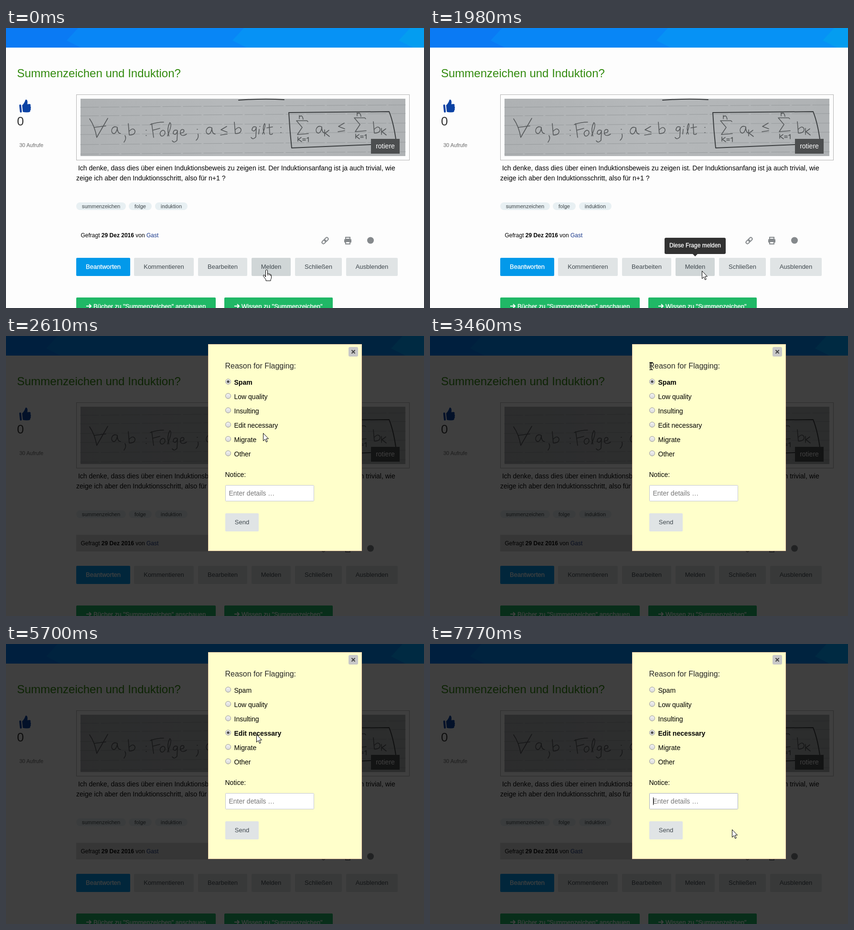
Animation of 875 by 586 pixels, one loop 8 s. Source, as an HTML page:

```html
<!DOCTYPE html>
<html lang="de">
<head>
<meta charset="utf-8">
<title>Frage melden</title>
<style>
html, body { margin: 0; width: 100%; height: 100%; overflow: hidden; background: #fdfdfd; }
svg { display: block; font-family: "Liberation Sans", Arial, sans-serif; }
.ink path { fill: none; stroke: #56595b; stroke-width: 1.6; stroke-linecap: round; stroke-linejoin: round; }
.ink .rule { stroke: #979b9d; stroke-width: 1; stroke-dasharray: 38 5; }
.ink .frame { stroke: #3c3f41; stroke-width: 2; }
.bright { fill: #fff; stroke: #fff; stroke-width: .3; }
.small { stroke: currentColor; fill: currentColor; stroke-width: .25; }
.cursor { fill: #fff; stroke: #000; stroke-linejoin: round; }
</style>
</head>
<body>
<svg id="stage" width="875" height="586" viewBox="0 0 875 586"></svg>
<script>
const stage = document.getElementById('stage');
const text = (x, y, size, str, attrs = '') => `<text x="${x}" y="${y}" font-size="${size}" ${attrs}>${str}</text>`;
const rect = (x, y, w, h, fill, attrs = '') => `<rect x="${x}" y="${y}" width="${w}" height="${h}" fill="${fill}" ${attrs}/>`;
const path = (d, attrs = '') => `<path d="${d}" ${attrs}/>`;
const group = (id, body) => `<g id="${id}">${body}</g>`;

// Header stripes: a base colour, then a slanted band from each x to the right edge
const header = (base, bands) => rect(0, 0, 875, 41, base) +
  bands.map(([x, fill]) => path(`M${x} 0L${x - 24} 26L${x + 6} 41H875V0Z`, `fill="${fill}"`)).join('');

const button = (x, w, label, fill = '#e0e4e5', attrs = 'fill="#3f484e"', id = '') =>
  rect(x, 481, w, 38, fill, `rx="2" id="${id}"`) +
  text(x + w / 2, 504, 13, label, `text-anchor="middle" ${attrs}`);

const tag = (x, w, label) => rect(x, 365, w, 16, '#e8f0f3', 'rx="8"') +
  text(x + w / 2, 377, 11, label, 'text-anchor="middle" class="small" color="#5c6468"');

const greenButton = (x, w, label) => rect(x, 564, w, 30, '#20b866', 'rx="2"') +
  path(`M${x + 21} 582h10m-4 -4l4 4l-4 4`, 'fill="none" stroke="#fff" stroke-width="2"') +
  text(x + 36, 587, 13, label, 'class="bright"');

// Handwritten formula on ruled paper
const sum = (x, y) => path(`M${x + 24} ${y + 2}L${x + 22} ${y}H${x}L${x + 12} ${y + 14}L${x + 2} ${y + 29}L${x + 25} ${y + 27}` +
  `M${x + 6} ${y - 4}v-7m0 3q6 -6 8 5` +
  `M${x + 3} ${y + 34}v9m7 -8l-6 4l7 5m2 -6h6m-6 3h6m3 -4l3 -2v9`);
const a = (x, y) => path(`M${x + 11} ${y}c-9 -5 -15 6 -10 12c6 4 10 -6 10 -12q0 13 7 13`);
const b = (x, y) => path(`M${x} ${y}l2 24q13 0 12 -9q-4 -8 -12 1`);
const leq = (x, y) => path(`M${x + 13} ${y}l-12 7l13 5M${x} ${y + 18}l14 -2`);
const g = (x, y) => path(`M${x + 9} ${y}q-8 -2 -8 7q6 5 9 -6l-1 20q-6 7 -10 1`);
const colon = (x, y) => path(`M${x} ${y}h1m-1 11h1`);
const sub = (x, y) => path(`M${x} ${y}v13m9 -12l-8 6l9 7`);
const ruled = [164, 182, 202, 221, 242, 262].map(y =>
  path(`M156 ${y + 2}Q490 ${y - 1} 836 ${y - 3}`, 'class="rule"')).join('');
const formula = `<g class="ink">${ruled}` +
  path('M487 151Q540 147 582 150', 'class="frame"') +
  path('M175 190Q186 206 190 229L213 189M184 208L209 205') +
  a(222, 208) + path('M249 225q4 6 -2 14') + b(256, 200) + colon(293, 214) +
  path('M305 200L309 229M302 202Q316 197 330 197M307 214L322 210') +
  path('M328 214c-9 4 -5 14 0 12c7 -3 6 -12 0 -12M338 226Q349 201 343 198Q336 210 341 226') +
  g(349, 214) + path('M365 220q10 -1 7 -7q-8 -3 -7 9q5 6 13 0M400 212h1m1 10q2 8 -4 13') +
  a(420, 209) + leq(449, 206) + b(478, 197) +
  g(514, 207) + path('M530 212l-1 10m2 -16h1M537 222q8 -20 4 -22q-5 10 0 22M551 201l1 21q4 2 6 -1M546 209l12 -2') +
  colon(575, 208) + path('M592 177L802 175Q812 200 817 240M764 244L598 251Q594 215 592 177', 'class="frame"') +
  sum(608, 194) + a(650, 207) + sub(667, 213) + leq(695, 199) +
  sum(729, 188) + b(769, 196) + sub(786, 210) + '</g>';

const icons =
  '<g fill="#0b42a4" transform="rotate(-6 40 164)"><rect x="28" y="159" width="4" height="17" rx="2"/>' +
  path('M34 161Q39 158 42 151Q43 149 45 151Q47 154 45 160H50Q53 161 51 165Q53 167 51 169Q52 172 50 173Q50 177 46 177Q38 177 34 175Z') + '</g>' +
  `<g transform="translate(668 445) rotate(-45)" fill="none" stroke="#85898c" stroke-width="2">
    <rect x="-8" y="-3" width="9" height="6" rx="3"/><rect x="-1" y="-3" width="9" height="6" rx="3"/></g>` +
  rect(711, 438, 9, 4, 'none', 'stroke="#85898c" stroke-width="2"') + rect(708, 442, 15, 7, '#85898c', 'rx="1"') +
  rect(711, 447, 9, 5, '#fdfdfd', 'stroke="#85898c" stroke-width="2"') +
  '<circle cx="763" cy="444.500" r="7" fill="#85898c"/>';

const page = header('#0a7af4', [[151, '#0886f6'], [498, '#0692f5'], [846, '#049df0']]) +
  text(23, 103, 24, 'Summenzeichen und Induktion?', 'fill="#318a0d"') +
  text(23, 204, 26, '0', 'fill="#333"') +
  text(28, 248.5, 11, '30 Aufrufe', 'class="small" color="#858585"') +
  rect(147.5, 139.5, 697, 137, '#fdfdfd', 'stroke="#b4b4b4"') +
  rect(156, 148, 680, 120, 'url(#paper)') + formula +
  rect(764, 232, 60, 31, '#4c4e4f') + text(794, 252, 14, 'rotiere', 'text-anchor="middle" fill="#fff"') +
  text(150.9, 298, 14, 'Ich denke, dass dies über einen Induktionsbeweis zu zeigen ist. Der Induktionsanfang ist ja auch trivial, wie') +
  text(147, 319, 14, 'zeige ich aber den Induktionsschritt, also für n+1 ?') +
  tag(147, 104, 'summenzeichen') + tag(257, 48, 'folge') + tag(312, 68, 'induktion') +
  text(156.5, 438, 12, 'Gefragt <tspan font-weight="bold">29 Dez 2016</tspan> von <tspan fill="#1b3a8c">Gast</tspan>') +
  icons +
  button(147, 113, 'Beantworten', '#0299ea', 'class="bright"') + button(268, 125, 'Kommentieren') +
  button(402, 103, 'Bearbeiten') + button(514, 82, 'Melden', undefined, undefined, 'flag') +
  button(605, 98, 'Schließen') + button(712, 108, 'Ausblenden') +
  greenButton(147, 292, 'Bücher zu "Summenzeichen" anschauen') + greenButton(457, 227, 'Wissen zu "Summenzeichen"');

const heading = fill => text(458.5, 68, 16, 'Reason for Flagging:', `fill="${fill}"`);
const reasons = ['Spam', 'Low quality', 'Insulting', 'Edit necessary', 'Migrate', 'Other'].map((label, i) =>
  `<g class="reason"><circle cx="465" cy="${95.5 + 30 * i}" r="5.500" fill="url(#radio)" stroke="#999"/>` +
  `<circle class="dot" cx="465" cy="${95.5 + 30 * i}" r="2.800" fill="#505050"/>` +
  text(477.5, 102 + 30 * i, 14, label) + '</g>').join('');

const dialog = rect(0, 0, 875, 586, '#000', 'opacity=".75"') +
  header('#001f3e', [[108, '#00233f'], [830, '#002a42']]) +
  rect(147, 416, 276, 35, '#000', 'opacity=".14"') +
  rect(423.5, 17.5, 321, 432, '#ffffcb', 'stroke="#f0d0a8"') +
  rect(717, 23, 20, 20, '#c8c8c8', 'rx="3"') + path('M723.500 29.500l7 7m0 -7l-7 7', 'stroke="#444" stroke-width="2"') +
  heading('#2a2a2a') +
  rect(459, 54, 0, 18, '#3297fd', 'id="selection"') + `<g clip-path="url(#selected)">${heading('#fff')}</g>` +
  reasons + text(458.5, 295, 14, 'Notice:') +
  rect(459.5, 312.5, 185, 33, '#fff', 'id="field" rx="1"') +
  text(466.5, 334, 14, 'Enter details …', 'fill="#777"') +
  rect(467, 321, 1, 16, '#000', 'id="caret"') +
  rect(459, 371, 70, 38, '#e0e4e5', 'rx="2"') + text(494, 394, 13, 'Send', 'text-anchor="middle" fill="#3f484e"');

const tooltip = path('M494 439H616Q619 439 619 442V470Q619 473 616 473H560L555 478L550 473H494Q491 473 491 470V442Q491 439 494 439Z', 'opacity=".8"') +
  text(555, 459, 12, 'Diese Frage melden', 'text-anchor="middle" class="bright"');

const cursors = {
  arrow: path('M.5 .5V16.500L4.200 13L6.800 19L9.200 18L6.700 12H11.500Z', 'class="cursor"'),
  hand: path('M-1.500 15V2Q-1.500 0 .5 0Q2.500 0 2.500 2V8Q5 7 5.500 9Q8 8 8.500 10Q10.500 10 10.500 12V16Q10.500 19 9 20.500V23H-1V20.500L-6.500 13Q-6.500 10 -4 11Z', 'class="cursor"') +
    path('M2.500 8v4M5.500 9v3M8.500 10v3', 'stroke="#000"'),
  beam: path('M-3.500 -7.500H-1Q0 -7.500 0 -6.500V6.500Q0 7.500 -1 7.500H-3.500M3.500 -7.500H1Q0 -7.500 0 -6.500M0 6.500Q0 7.500 1 7.500H3.500', 'fill="none" stroke="#000" stroke-width="1.300"')
};

stage.innerHTML = `<defs>
  <linearGradient id="paper"><stop stop-color="#aeb1b3"/><stop offset=".45" stop-color="#b5b8ba"/><stop offset="1" stop-color="#afb2b4"/></linearGradient>
  <linearGradient id="radio" x2="0" y2="1"><stop stop-color="#f4f4f4"/><stop offset="1" stop-color="#d8d8d8"/></linearGradient>
  <clipPath id="selected"><rect id="selectedClip" x="459" y="54" width="0" height="18"/></clipPath></defs>` +
  page + group('dialog', dialog) + group('tooltip', tooltip) +
  group('pointer', Object.entries(cursors).map(([name, body]) => group(name, body)).join(''));

const el = id => document.getElementById(id);
const set = (id, name, value) => el(id).setAttribute(name, value);
const show = (id, on) => set(id, 'visibility', on ? 'visible' : 'hidden');

// Share of a stepped move that is done: n equal jumps, the first at start, the last at end
const stepped = (t, start, end, n) => t < start ? 0 :
  n === 1 ? 1 : Math.min(n, Math.floor((t - start) / (end - start) * (n - 1) + 1e-6) + 1) / n;

// Pointer moves: start, end, jumps, x, y
const moves = [
  [180, 180, 1, 546, 507], [1030, 1185, 3, 543, 507], [1262, 1650, 6, 569, 509], [1980, 1980, 1, 569, 508],
  [2130, 2750, 9, 529, 116], [2830, 3224, 6, 468, 55], [3303, 3460, 3, 463, 63],
  [3630, 3963, 5, 590, 63], [4050, 4380, 5, 522, 122], [4470, 4470, 1, 522, 123],
  [4630, 4770, 3, 520, 151], [4860, 5170, 5, 524, 189],
  [6190, 6530, 5, 560, 330], [6615, 6700, 2, 608, 365], [7130, 7280, 3, 632, 388]
];

function pointerAt(t) {
  let x = 545, y = 506;
  for (const [start, end, n, toX, toY] of moves) {
    const k = stepped(t, start, end, n);
    x += (toX - x) * k;
    y += (toY - y) * k;
  }
  return [Math.round(x), Math.round(y)];
}

function draw(t) {
  const [x, y] = pointerAt(t);
  const overText = t > 2040 && (y > 50 && y < 74 || y > 312 && y < 346);
  const kind = t < 1980 ? 'hand' : overText ? 'beam' : 'arrow';
  set('pointer', 'transform', `translate(${x} ${y})`);
  for (const name in cursors) show(name, name === kind);

  show('dialog', t >= 2040);
  set('flag', 'fill', t < 2130 ? '#d0d6d7' : '#e0e4e5');
  set('tooltip', 'opacity', stepped(t, 340, 570, 4) - stepped(t, 2130, 2285, 3));

  const selected = t < 3630 || t >= 4470 ? 0 : t < 3963 ? x - 464 : 126;
  set('selection', 'width', selected);
  set('selectedClip', 'width', selected);

  const choice = t < 4470 ? 0 : t < 4937 ? 1 : t < 5610 ? 2 : 3;
  document.querySelectorAll('.reason').forEach((row, i) => {
    row.setAttribute('font-weight', i === choice ? 'bold' : 'normal');
    row.querySelector('.dot').setAttribute('visibility', i === choice ? 'inherit' : 'hidden');
  });

  set('field', 'stroke', t < 6615 ? '#c4c8d0' : '#a9afbd');
  // The caret blinks about every 530 ms once the field has the focus
  show('caret', t >= 6615 && t < 7240 || t >= 7770);
}

function tick() {
  draw(performance.now() % 8000);
  requestAnimationFrame(tick);
}
tick();
</script>
</body>
</html>
```
